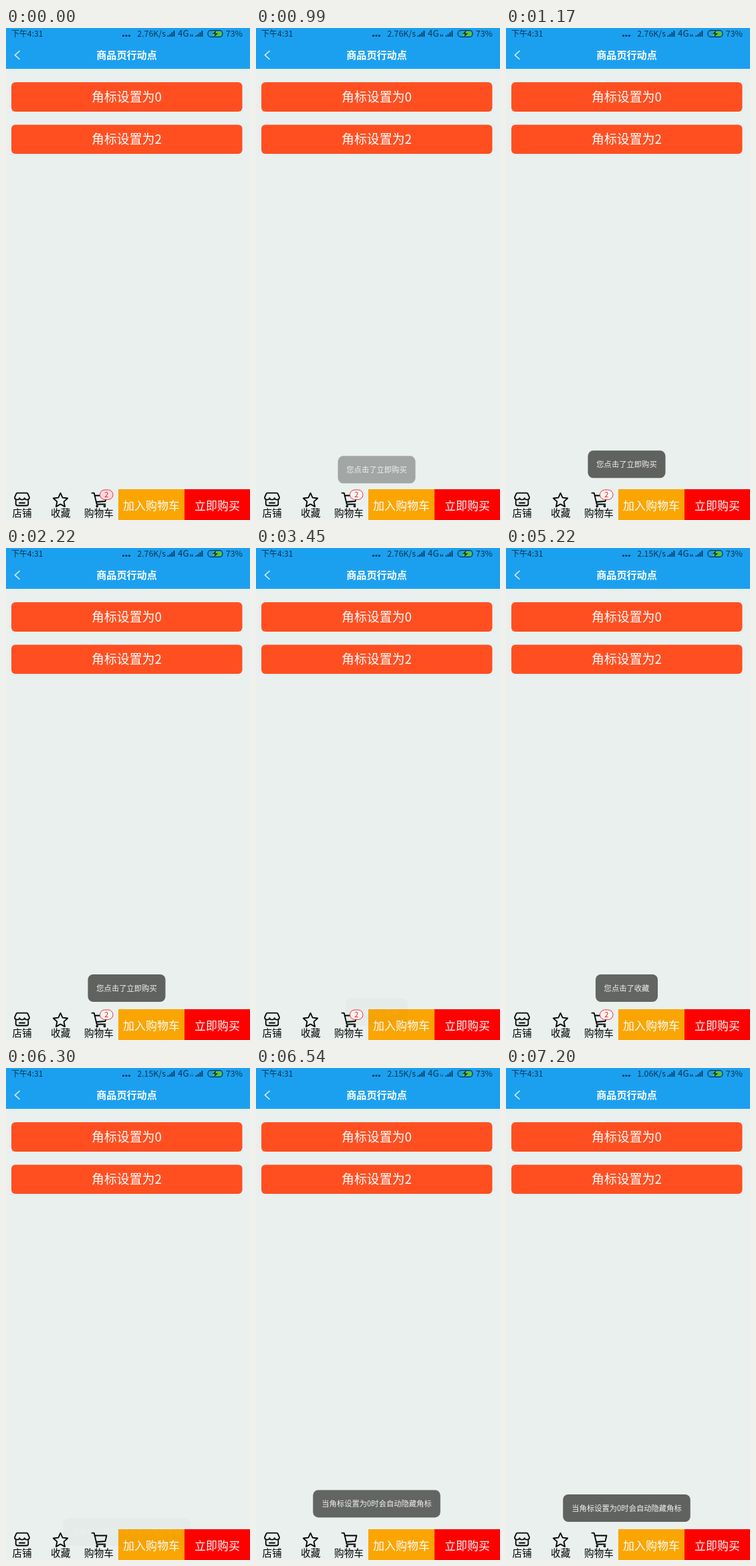
Write an HTML page that moves like this. It is 365 px wide and 735 px high and loops after 8000 ms.

```html
<!DOCTYPE html>
<html lang="zh-CN">
<head>
<meta charset="utf-8">
<title>商品页行动点</title>
<style>
  html, body { margin: 0; width: 100%; height: 100%; overflow: hidden; background: #e9f0ee; }
  svg { display: block; width: 365px; height: 735px; }
  text { font-family: "Noto Sans CJK SC", "Noto Sans CJK", "Noto Sans", sans-serif; }
  .mid { text-anchor: middle; }
  .end { text-anchor: end; }
  .status { fill: #10334d; font-size: 12.4px; }
  .label { font-size: 14.6px; fill: #000; }
  .button { font-size: 18.9px; fill: #fff; }
  .action { font-size: 17px; fill: #fff; }
  .icon { fill: none; stroke: #000; stroke-width: 1.8; stroke-linecap: round; stroke-linejoin: round; }
</style>
</head>
<body>
<svg viewBox="0 0 365 735">
  <defs>
    <path id="bars" d="M0 13v-2h1.8v2zM3 13v-4h1.8v4zM6 13V6.5h1.8V13zM9 13V4h1.8v9z" fill="#10334d"/>
  </defs>
  <rect width="365" height="735" fill="#e9f0ee"/>
  <rect width="365" height="61" fill="#1ba0f0"/>

  <g class="status">
    <text x="8" y="13" font-size="12">下午4:31</text>
    <circle cx="175.5" cy="11.5" r="1.6"/>
    <circle cx="180" cy="11.5" r="1.6"/>
    <circle cx="184.5" cy="11.5" r="1.6"/>
    <text id="speed" class="end" x="239" y="13.3">2.76K/s</text>
    <use href="#bars" x="241.5"/>
    <text x="257" y="13.3" style="font-size:13.3px">4G</text>
    <path id="traffic" d="M275.5 9.5h1.5v3.5h-1.5zM278.2 9.5h1.5v3.5h-1.5z"/>
    <use href="#bars" x="283.5"/>
    <rect x="309" y="5" width="13.5" height="7" rx="3" fill="#5fc52e"/>
    <rect x="302" y="3.7" width="22" height="9.6" rx="4.5" fill="none" stroke="#10334d" stroke-width="1.2"/>
    <path d="M314.5 3.6l-6 5.2h4l-1.4 4.6 6.2-5.5h-4z"/>
    <text class="end" x="354" y="13.3">73%</text>
  </g>

  <path d="M20.5 34l-7 6.5 7 6.5" fill="none" stroke="#d4ecfc" stroke-width="1.7"/>
  <text class="mid" x="180.5" y="46.3" font-size="15.1" font-weight="700" fill="#fff">商品页行动点</text>

  <rect x="8" y="81" width="345.5" height="44" rx="6" fill="#ff4f21"/>
  <text class="mid button" x="180.5" y="109.7">角标设置为0</text>
  <rect x="8" y="144.5" width="345.5" height="43.5" rx="6" fill="#ff4f21"/>
  <text class="mid button" x="180.5" y="173">角标设置为2</text>

  <g class="icon">
    <path d="M17 694.7h14q1.2 0 1.7 1.2l2.3 5.2q0 3.6-3.6 3.6-3.2 0-3.7-2.6-.6 2.6-3.7 2.6t-3.7-2.6q-.5 2.6-3.7 2.6-3.6 0-3.6-3.6l2.3-5.2q.5-1.2 1.7-1.2z"/>
    <path d="M14.7 706v4.700q0 2.800 2.800 2.800h13q2.800 0 2.800-2.800V706M20 709.500h8"/>
    <path id="star"/>
    <path d="M128.500 694.700h3.300l4 16.800h12.700M133 698.500h17.500l-2 8.500-13.300 1"/>
    <circle cx="136.300" cy="714.300" r="1" />
    <circle cx="147.500" cy="714.300" r="1"/>
  </g>
  <text class="mid label" x="24" y="730">店铺</text>
  <text class="mid label" x="81.700" y="730">收藏</text>
  <text class="mid label" x="139" y="730">购物车</text>

  <g id="badge">
    <rect id="badgeFill" x="140.500" y="690" width="19.500" height="14.500" rx="7.250" stroke="#f0302c"/>
    <text class="mid" x="150.300" y="701.300" font-size="11" fill="#f0201c">2</text>
  </g>

  <rect x="168" y="689" width="99" height="46" fill="#faa502"/>
  <text class="mid action" x="217.500" y="719.500">加入购物车</text>
  <rect x="267" y="689" width="98" height="46" fill="#fe0000"/>
  <text class="mid action" x="316" y="719.500">立即购买</text>

  <g id="toast">
    <rect id="toastBox" y="637" height="41" rx="8" fill="#5f625f"/>
    <text id="toastText" class="mid" x="180.500" y="661.700" font-size="11.300" fill="#f0f0f0"></text>
  </g>
</svg>
<script>
const LOOP = 8000, ENTER = 500, FADE_IN = 300, FADE_OUT = 300, RISE = 50;
const toasts = [
  { text: '您点击了立即购买', width: 116, from: 840, until: 2700 },
  { text: '您点击了收藏', width: 93, from: 3420, until: 5190 },
  { text: '当角标设置为0时会自动隐藏角标', width: 190.5, from: 6270, until: Infinity }
];
const $ = id => document.getElementById(id);
const clamp = v => Math.max(0, Math.min(1, v));
const smooth = v => (1 - Math.cos(Math.PI * clamp(v))) / 2;
const overshoot = v => { const s = v - 1; return s * s * (3 * s + 2) + 1; };

const starPoints = Array.from({ length: 10 }, (_, i) => {
  const r = i % 2 ? 5.3 : 11.3, a = (i / 5 - 0.5) * Math.PI;
  return `${81.5 + r * Math.cos(a)} ${706 + r * Math.sin(a)}`;
});
$('star').setAttribute('d', `M${starPoints.join('L')}Z`);

function drawToast(t) {
  const toast = toasts.find(m => t >= m.from && t < m.until + FADE_OUT);
  $('toast').style.display = toast ? '' : 'none';
  if (!toast) return;
  const age = t - toast.from;
  const lift = RISE * (1 - overshoot(clamp(age / ENTER)));
  const alpha = smooth(age / FADE_IN) * (1 - smooth((t - toast.until) / FADE_OUT));
  $('toast').setAttribute('transform', `translate(0 ${lift})`);
  $('toast').setAttribute('opacity', alpha);
  $('toastBox').setAttribute('x', 180.5 - toast.width / 2);
  $('toastBox').setAttribute('width', toast.width);
  $('toastText').textContent = toast.text;
}

function draw(t) {
  drawToast(t);
  $('speed').textContent = (t < 3600 ? '2.76' : t < 7200 ? '2.15' : '1.06') + 'K/s';
  $('traffic').setAttribute('opacity', t >= 5850 && t < 6600 ? 0.45 : 0.85);
  $('badge').style.display = t < 6300 ? '' : 'none';
  $('badgeFill').setAttribute('fill', t < 870 ? '#f8dbe3' : '#f6f6f5');
}

const start = performance.now();
function tick() {
  draw((performance.now() - start) % LOOP);
  requestAnimationFrame(tick);
}
tick();
</script>
</body>
</html>
```
